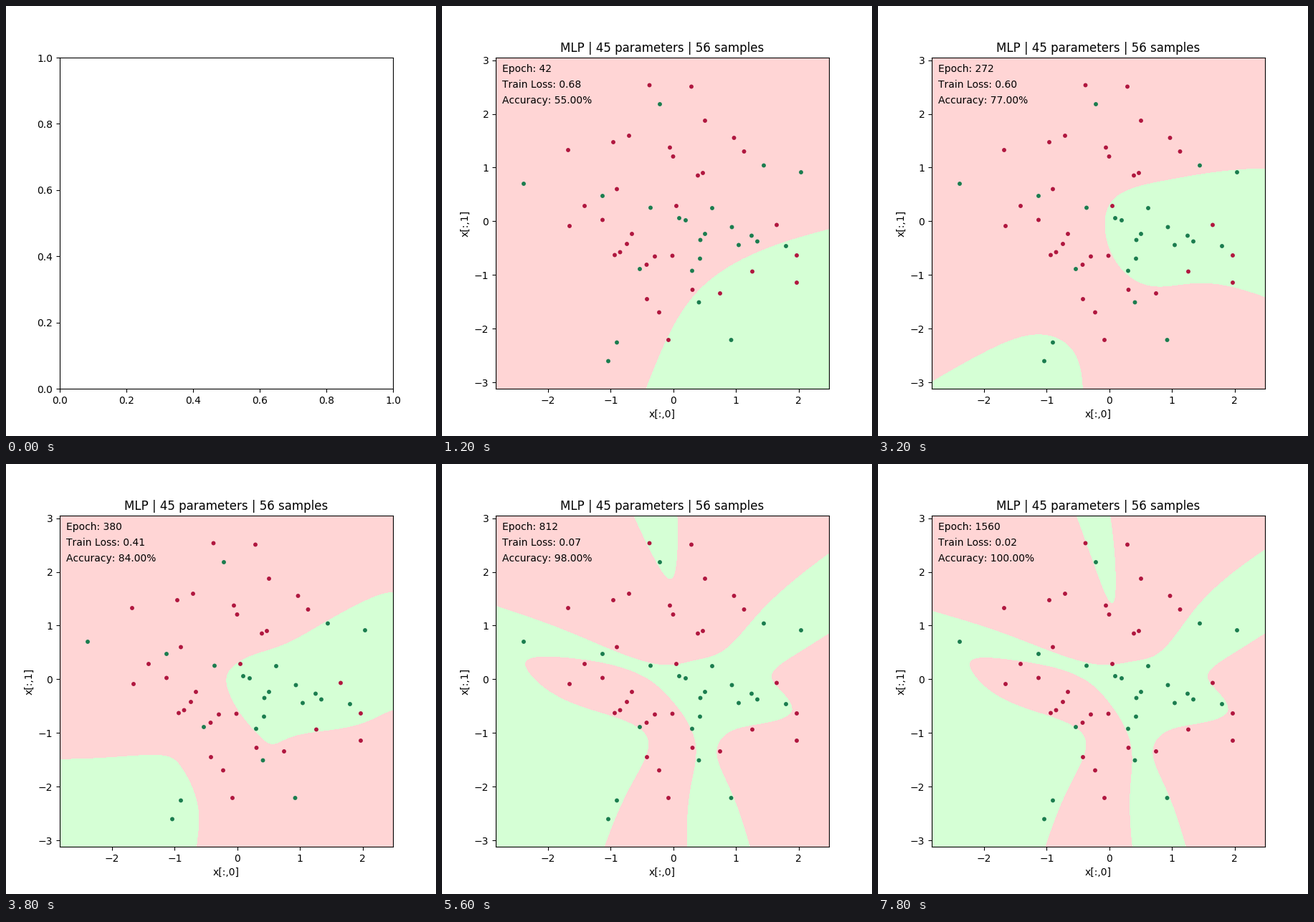
Animation, 600 px wide and 600 px high, one loop 8000 ms. Source, as a matplotlib script:

```python
import matplotlib.pyplot as plt
import numpy as np
from matplotlib.animation import FuncAnimation
from matplotlib.path import Path

FRAMES, INTERVAL = 40, 200
PINK, MINT = "#ffd5d5", "#d5ffd5"
RED, GREEN = "#b0173f", "#1b7d4f"

# Axes box in pixels and far corners that close the open regions
LEFT, RIGHT, TOP, BOTTOM = 75, 540, 72, 534
SE, SW = 900 + 900j, -300 + 900j

RED_XY = [
    289.5, 110.5, 348, 112.5, 367, 160, 407.5, 184, 421.5, 203, 261, 181,
    239, 190, 176, 201, 318, 197.5, 322.5, 210, 357, 236.5, 364, 233,
    244, 255.5, 327, 279, 199, 279, 224, 298.5, 178, 307, 265, 318,
    258, 332, 248.5, 343.5, 241, 347.5, 285.5, 361, 297, 349.5, 321.5, 348.5,
    349.5, 396, 388, 401, 433, 370.5, 495, 348, 495, 386, 467, 305.5,
    286, 409, 303, 427.5, 316, 466]
GREEN_XY = [
    304, 137, 114, 248, 224, 265, 291, 281.5, 449, 222.5, 501, 232,
    377, 282, 331, 296, 340, 299, 404.5, 308.5, 367, 318, 360.5, 326.5,
    432, 320.5, 440, 328.5, 414, 333.5, 480, 335, 360, 352.5, 349, 369.5,
    276, 367, 358.5, 413.5, 244, 469.5, 232, 495.5, 403.5, 466]


def to_data(px, py):
    return (px - 322.8) / 87.4, (300.4 - py) / 74.93


def pairs(xy):
    return np.array(xy[::2], float), np.array(xy[1::2], float)


gx, gy = np.meshgrid(np.linspace(LEFT, RIGHT, 156), np.linspace(TOP, BOTTOM, 155))
grid = gx + 1j * gy


def spline(p, n=10):
    """Natural cubic spline through complex points."""
    h = abs(np.diff(p)) ** 0.7
    slope = np.diff(p) / h
    m, rhs = np.eye(len(p)), np.zeros(len(p), complex)
    for i in range(1, len(p) - 1):
        m[i, i - 1:i + 2] = h[i - 1], 2 * (h[i - 1] + h[i]), h[i]
        rhs[i] = 6 * (slope[i] - slope[i - 1])
    bend = np.linalg.solve(m, rhs)
    u = np.arange(n) / n
    v = 1 - u
    parts = [v * p[i] + u * p[i + 1]
             + h[i] ** 2 / 6 * ((v**3 - v) * bend[i] + (u**3 - u) * bend[i + 1])
             for i in range(len(h))]
    return np.append(np.concatenate(parts), p[-1])


def region(*xy, corners=()):
    """Unsigned distance to the edge, and the mask of what it encloses."""
    x, y = pairs(xy)
    edge = spline(x + 1j * y)
    dist = np.full(grid.shape, np.inf)
    for a, b in zip(edge[:-1], edge[1:]):
        ab = b - a
        t = np.clip(((grid - a) * np.conj(ab)).real / abs(ab) ** 2, 0, 1)
        dist = np.minimum(dist, abs(grid - a - t * ab))
    poly = np.append(edge, np.array(corners, complex))
    path = Path(np.column_stack([poly.real, poly.imag]))
    inside = path.contains_points(np.column_stack([gx.ravel(), gy.ravel()]))
    return dist, inside.reshape(grid.shape)


def field(*regions):
    """Softened signed distance, positive on the green side."""
    dist = np.minimum.reduce([r[0] for r in regions])
    inside = np.logical_xor.reduce([r[1] for r in regions])
    d = np.where(inside, dist, -dist)
    return d / np.hypot(1, d / 80)


def bay(s):
    """Red area at the lower right; s opens its mouth downwards."""
    return region(446 + 8 * s, 600, 402 + 8 * s, 455, 383 - 6 * s, 398 - 4 * s,
                  398 - 4 * s, 375 - 6 * s, 455 - 3 * s, 360 - 5 * s,
                  488 - 10 * s, 343 - 8 * s, 470 + s, 314, 459 + 8 * s, 296,
                  495, 264 + 3 * s, 590, 203 + 4 * s, corners=[SE])


def grown(g):
    """Nearly trained state, g from 0 to 1."""
    lobe = region(250 + 12 * g, 30, 296 + 6 * g, 130 + 10 * g,
                  319 + 8 * g, 160 + 34 * g, 328 + 3 * g, 120 + 30 * g,
                  325 - 8 * g, 30)
    band = region(30, 184 + 9 * g, 170, 232 + 3 * g, 255, 267, 318, 281,
                  355, 274 + 2 * g, 388, 264 + 3 * g, 445, 206 - 6 * g,
                  590, 90 - 2 * g, corners=[SE, SW])
    finger = region(212 + 8 * g, 575, 262 + 4 * g, 450, 287 + 2 * g, 385,
                    260 + 2 * g, 361, 150 + 5 * g, 318 - 2 * g,
                    116 + 12 * g, 276, 165 + 15 * g, 269 + 3 * g,
                    280 + 5 * g, 295 + 3 * g, 320 + g, 328 + 2 * g,
                    354 - g, 388 + 2 * g, 346 + 6 * g, 460, 346 + 18 * g, 600)
    return field(lobe, band, finger, bay(0))


STAGES = [
    field(region(240, 575, 330, 455, 580, 345, corners=[SE])),
    field(region(270, 575, 300, 497, 355, 401, 450, 340, 585, 301, corners=[SE])),
    field(region(325, 575, 316, 465, 340, 368, 430, 243, 585, 86, corners=[SE])),
    field(region(590, 227, 500, 229, 400, 244, 330, 269, 317, 302, 335, 360,
                 380, 390, 450, 386, 590, 425),
          region(40, 546, 150, 483, 230, 459, 272, 482, 285, 575, corners=[SW])),
    field(region(245, 35, 280, 95, 301, 115, 314, 92, 315, 35),
          region(30, 137, 120, 190, 228, 256, 210, 272, 100, 270, 92, 293,
                 175, 347, 270, 368, 284, 410, 220, 575, corners=[SW]),
          region(590, 45, 500, 135, 430, 217, 388, 260, 330, 276, 294, 289,
                 325, 346, 359, 392, 346, 465, 360, 600, corners=[SE]),
          bay(1)),
    grown(0),
    grown(1)]
STEPS = [1, 6, 10, 16, 22, 28, 39]
LOSS = [0.70, 0.68, 0.63, 0.60, 0.22, 0.07, 0.02]
CORRECT = [30, 31, 37, 43, 51, 55, 56]

X, Y = to_data(gx, gy)
xlim = X[0, 0], X[0, -1]
ylim = Y[-1, 0], Y[0, 0]
red, green = (np.array(to_data(*pairs(xy))) for xy in (RED_XY, GREEN_XY))
dots = np.hstack([red, green])
dot_colors = [RED] * red.shape[1] + [GREEN] * green.shape[1]
samples = dots.shape[1]


def blur(n, sigma):
    i = np.arange(n)
    w = np.exp(-((i[:, None] - i) / sigma) ** 2 / 2)
    return w / w.sum(axis=1, keepdims=True)


def blend(step):
    """Mix neighbouring stages, rounding off kinks halfway between them."""
    i = min(np.searchsorted(STEPS, step, side="right") - 1, len(STEPS) - 2)
    w = (step - STEPS[i]) / (STEPS[i + 1] - STEPS[i])
    mix = (1 - w) * STAGES[i] + w * STAGES[i + 1]
    sigma = 12 * w * (1 - w) + 0.01
    rows, cols = mix.shape
    return blur(rows, sigma) @ mix @ blur(cols, sigma).T


plt.rcParams["text.kerning_factor"] = 6
fig, ax = plt.subplots(figsize=(6, 6), dpi=100)


def draw(step):
    ax.clear()
    if step == 0:
        return
    ax.contourf(X, Y, blend(step), levels=[-1000, 0, 1000], colors=[PINK, MINT])
    ax.scatter(*dots, s=18, c=dot_colors, linewidths=0)

    loss = np.interp(step, STEPS, LOSS)
    hits = round(float(np.interp(step, STEPS, CORRECT)))
    lines = (f"Epoch: {step * (step + 1)}",
             f"Train Loss: {loss:.2f}",
             f"Accuracy: {round(100 * hits / samples):.2f}%")
    for i, line in enumerate(lines):
        y = (BOTTOM - 92 - 22 * i) / (BOTTOM - TOP)
        ax.text(0.02, y, line, transform=ax.transAxes)

    ax.set(xlim=xlim, ylim=ylim, xlabel="x[:,0]", ylabel="x[:,1]",
           title=f"MLP | 45 parameters | {samples} samples")


anim = FuncAnimation(fig, draw, frames=FRAMES, interval=INTERVAL,
                     repeat=True, repeat_delay=0)
plt.show()
```
